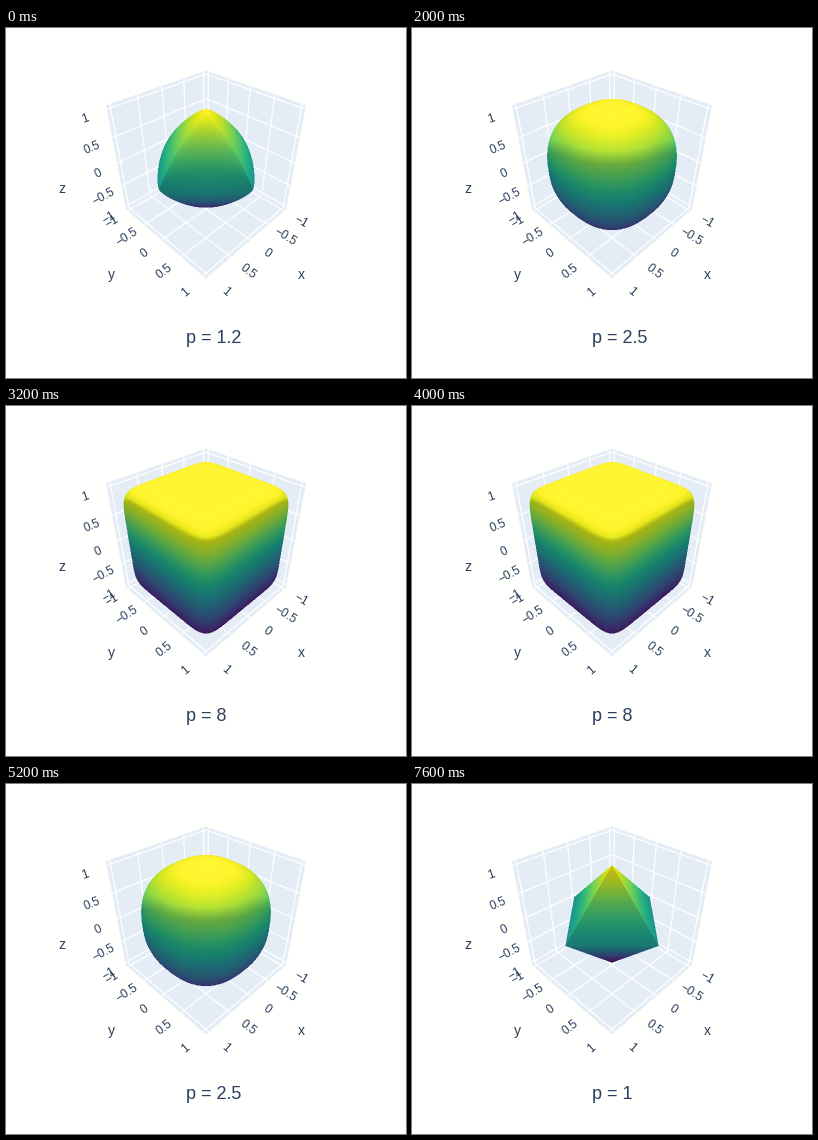
Recreate the animation shown at these times as a matplotlib script. Size 400 by 350 pixels, loop 8 s.

```python
import numpy as np
import matplotlib
import matplotlib.pyplot as plt
from matplotlib.animation import FuncAnimation

W, H, DPI = 400, 350, 100
PT = 72 / DPI
INK, PANE, PAPER = "#2a3f5f", "#e4edf6", "#fffffd"
FONT = "Liberation Sans"

# Perspective camera on the cube's diagonal
B = 1.0625                                   # half side of the axes box
CX, CY = 200, 135
FOCAL = 135 / np.tan(np.pi / 8)
DIST = 3 * np.sqrt(3) * B
RIGHT = np.array([-1, 1, 0]) / np.sqrt(2)
UP = np.array([-1, -1, 2]) / np.sqrt(6)
VIEW = np.array([1, 1, 1]) / np.sqrt(3)

# Ball image: pixel box and supersampling
X0, X1, Y0, Y1 = 104, 296, 44, 236
SS = 2

TICKS = {-1: "\u22121", -0.5: "\u22120.5", 0: "0", 0.5: "0.5", 1: "1"}
POWERS = [1, 1.2, 1.4, 1.6, 1.8, 2, 2.5, 3, 4, 8, np.inf]
STEPS = list(range(1, 11)) + list(range(9, -1, -1))


def project(point):
    point = np.asarray(point, float)
    k = FOCAL / (DIST - point @ VIEW)
    return CX + k * (point @ RIGHT), CY - k * (point @ UP)


def place(**coords):
    return [coords[a] for a in "xyz"]


def trace(p):
    """Rays against the unit ball of the p-norm: points, normals, hit mask."""
    px = np.arange(X0, X1, 1 / SS) + 0.5 / SS
    py = np.arange(Y0, Y1, 1 / SS) + 0.5 / SS
    gx, gy = np.meshgrid((px - CX) / FOCAL, (CY - py) / FOCAL)
    ray = gx[..., None] * RIGHT + gy[..., None] * UP - VIEW
    t = np.full(gx.shape, DIST - 1.75)
    q = min(p, 400)
    for _ in range(16):
        pos = DIST * VIEW + t[..., None] * ray
        size = np.abs(pos)
        norm = (size ** q).sum(-1) ** (1 / q)
        grad = np.sign(pos) * (size / norm[..., None]) ** (q - 1)
        slope = (grad * ray).sum(-1)
        step = (1 - norm) / np.minimum(slope, -1e-9)
        t += np.where(slope < 0, np.clip(step, 0, 4), 0)
    normal = grad / np.linalg.norm(grad, axis=-1, keepdims=True)
    return pos, normal, norm < 1.002


def shade(p):
    pos, normal, hit = trace(p)
    light = UP + 0.03 * VIEW
    light /= np.linalg.norm(light)
    half = (light + VIEW) / np.linalg.norm(light + VIEW)
    diffuse = np.minimum(0.8 + 0.8 * np.maximum(normal @ light, 0), 1)
    c2 = np.clip(normal @ half, 0.05, 1) ** 2
    gloss = np.exp(-(1 / c2 - 1) / 0.25) / (np.pi * 0.25 * c2 ** 2)
    base = matplotlib.colormaps["viridis"]((pos[..., 2] + 1) / 2)[..., :3]
    rgb = np.clip(base * diffuse[..., None] + 0.05 * gloss[..., None], 0, 1)
    rgba = np.dstack([rgb * hit[..., None], hit])
    rows, cols = rgba.shape[0] // SS, rgba.shape[1] // SS
    rgba = rgba.reshape(rows, SS, cols, SS, 4).mean((1, 3))
    rgba[..., :3] /= np.maximum(rgba[..., 3:], 1e-6)
    return np.clip(rgba, 0, 1)


def write(point, text, size, angle=0, va="center"):
    x, y = project(point)
    ax.text(x, y, text, size=size * PT, color=INK, family=FONT, ha="center",
            va=va, rotation=angle, rotation_mode="anchor")


def draw_pane(fixed):
    a, b = [c for c in "xyz" if c != fixed]
    square = [(-B, -B), (B, -B), (B, B), (-B, B)]
    pts = [project(place(**{fixed: -B, a: u, b: v})) for u, v in square]
    ax.fill(*zip(*pts), color=PANE, lw=0.3)
    for m, n in ((a, b), (b, a)):
        for v in TICKS:
            ends = [project(place(**{fixed: -B, m: v, n: s})) for s in (-B, B)]
            ax.plot(*zip(*ends), color="white", lw=1.2 * PT,
                    solid_capstyle="butt")


def draw_labels(axis, out, fixed):
    """Labels of one axis, set outward from its edge along the grid lines."""
    def at(v, gap):
        return place(**{axis: v, out: B + gap, fixed: -B})

    for v, text in TICKS.items():
        (xa, ya), (xb, yb) = project(at(v, 0)), project(at(v, 0.37))
        angle = np.degrees(np.arctan((ya - yb) / (xb - xa)))
        write(at(v, 0.37), text, 12, angle, "center_baseline")
    write(at(0, 0.98), axis, 14)


fig = plt.figure(figsize=(W / DPI, H / DPI), dpi=DPI, facecolor=PAPER)
ax = fig.add_axes([0, 0, 1, 1])
for name in "xyz":
    draw_pane(name)
draw_labels("x", "y", "z")
draw_labels("y", "x", "z")
draw_labels("z", "x", "y")

balls = [shade(p) for p in POWERS]
ball = ax.imshow(balls[1], extent=(X0, X1, Y1, Y0), interpolation="nearest",
                 aspect="auto", zorder=5)
caption = ax.text(180, 315, "", size=18 * PT, color=INK, family=FONT,
                  va="baseline")
ax.set_xlim(0, W)
ax.set_ylim(H, 0)
ax.axis("off")


def update(i):
    k = STEPS[i]
    p = POWERS[k]
    ball.set_data(balls[k])
    caption.set_text("p = \u221e" if np.isinf(p) else f"p = {p:g}")
    return ball, caption


anim = FuncAnimation(fig, update, frames=len(STEPS), interval=400,
                     repeat=True, repeat_delay=0)
plt.show()
```
